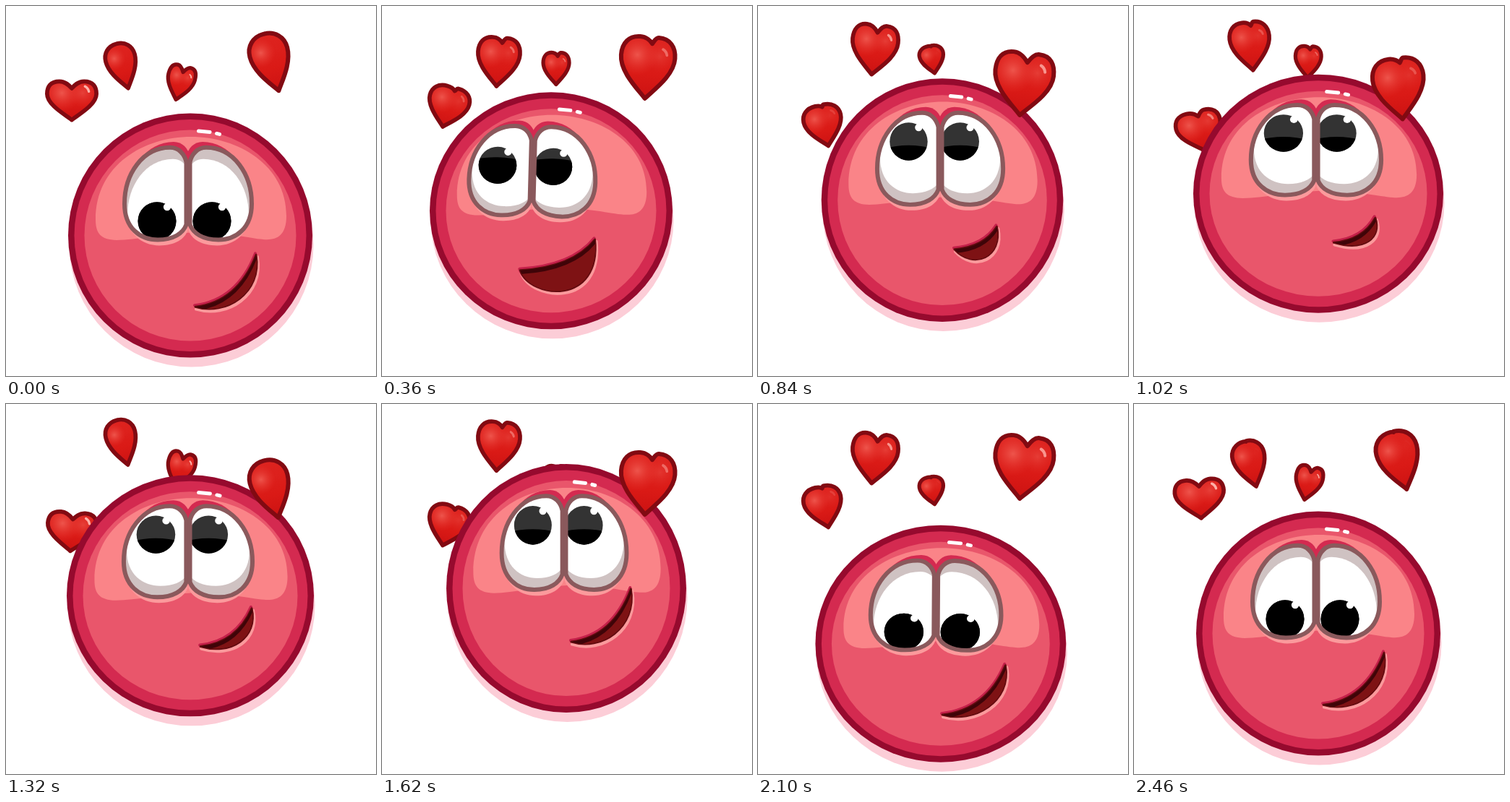
Recreate the animation shown at these times as an HTML page with a canvas. Size 512 px wide and 512 px high, loop 2.52 s.

```html
<!DOCTYPE html>
<html lang="en">
<head>
<meta charset="utf-8">
<title>In love</title>
<style>
html, body { margin: 0; height: 100%; overflow: hidden; background: #fff; }
canvas { display: block; width: 100vmin; height: 100vmin; }
</style>
</head>
<body>
<canvas id="stage" width="512" height="512"></canvas>
<script>
const ctx = document.getElementById('stage').getContext('2d');
const LOOP = 2520, SPIN = LOOP / 2, STEP = 60, TAU = Math.PI * 2;
const LEAN = .26;

// Each heart bobs once per loop (lowest at `low`) and half-turns every SPIN.
const hearts = [
  { x: 91, y: 154, bob: 23, low: 1260, edge: [46, 66], front: [74, 59], leanAt: 315, faceAt: 0 },
  { x: 241, y: 97, bob: 23, low: 2060, edge: [37, 40], front: [43, 53], leanAt: 50, faceAt: 70 },
  { x: 161, y: 68, bob: 15, low: 0, edge: [46, 69], front: [72, 75], leanAt: 615, faceAt: 660 },
  { x: 367, y: 98, bob: 20, low: 1260, edge: [58, 87], front: [91, 93], leanAt: 615, faceAt: 660 }
];

const mix = (a, b, k) => a + (b - a) * k;

function ease(t, from, to) {
  const k = Math.min(1, Math.max(0, (t - from) / (to - from)));
  return k * k * (3 - 2 * k);
}

const pulse = (t, at, before, after = before) => ease(t, at - before, at) - ease(t, at, at + after);

function poseAt(t) {
  const up = ease(t, 0, 600) - ease(t, 1620, 2010);
  const peek = pulse(t, 360, 360, 240);
  const wow = pulse(t, 600, 240, 420);
  const calm = pulse(t, 1020, 420, 600);
  const glance = pulse(t, 1860, 240, 300);
  const dip = pulse(t, 120, 120) + pulse(t, 2070, 210);
  const hover = pulse(t, 810, 210) + pulse(t, 1320, 300);
  const stretch = 7.5 * wow - 4 * calm + 6 * pulse(t, 1740, 240) - 5 * dip - 2 * peek;
  const radius = 169 - 3 * (peek + wow + glance);
  const eyeX = -3 - 23 * peek - 33 * glance;
  const eyeY = -58 - 4 * up + 4 * peek + 11 * wow + 32 * glance;
  return {
    x: 255 - 21 * (peek + glance),
    y: 317.5 - up * (50 + t / 130) + 15 * dip + 8 * hover,
    rx: radius - stretch,
    ry: radius + stretch,
    eyes: {
      x: eyeX, y: eyeY,
      tilt: .026 * peek + .06 * glance,
      px: -43 - 5 * peek - up,
      py: 38 - 62 * up - 5 * peek,
      gap: 76 - 4 * up + 4 * peek,
      lid: 1.8 * up - 1.6
    },
    mouth: {
      x: eyeX + 52 - 17 * peek - 6 * wow - 8 * glance,
      y: eyeY + 121 - 22 * up + 13 * peek + 6 * wow + 15 * calm,
      w: 84 + 20 * peek - 20 * wow - 28 * calm + 10 * glance,
      h: 72 - 28 * peek - 46 * wow - 37 * calm - 13 * glance,
      right: 53 + 42 * peek + 12 * wow - 25 * calm - 8 * glance,
      left: 13 + 28 * peek + 40 * wow
    }
  };
}

function fill(path, color, dx = 0, dy = 0) {
  ctx.save();
  ctx.translate(dx, dy);
  ctx.fillStyle = color;
  ctx.fill(path);
  ctx.restore();
}

function line(path, width, color) {
  ctx.lineWidth = width;
  ctx.strokeStyle = color;
  ctx.stroke(path);
}

function ellipse(x, y, rx, ry, color) {
  ctx.beginPath();
  ctx.ellipse(x, y, rx, ry, 0, 0, TAU);
  ctx.fillStyle = color;
  ctx.fill();
}

function heartPath(w, h, open) {
  const p = new Path2D(), lobe = .25 * w * open, top = -h / 2;
  const notchX = .28 * w * open * (1 - open), notchY = top + .18 * h * open ** 1.5;
  const reach = lobe + (.28 - .1 * open) * w;
  p.moveTo(0, h / 2);
  p.bezierCurveTo(-.14 * w, .36 * h, -.5 * w, .1 * h, -.5 * w, -.18 * h);
  p.bezierCurveTo(-.5 * w, -.37 * h, -reach, top, -lobe, top);
  p.bezierCurveTo(mix(-lobe, notchX, .5), top, notchX - lobe * .2, mix(top, notchY, .6), notchX, notchY);
  p.bezierCurveTo(notchX + lobe * .2, mix(top, notchY, .6), mix(notchX, lobe, .5), top, lobe, top);
  p.bezierCurveTo(reach, top, .5 * w, -.37 * h, .5 * w, -.18 * h);
  p.bezierCurveTo(.5 * w, .1 * h, .14 * w, .36 * h, 0, h / 2);
  p.closePath();
  return p;
}

function glow(x, y, r, alpha) {
  const g = ctx.createRadialGradient(x, y, 0, x, y, r);
  g.addColorStop(0, `rgba(242,98,88,${alpha})`);
  g.addColorStop(1, 'rgba(232,55,48,0)');
  return g;
}

function drawHeart({ x, y, bob, low, edge, front, leanAt, faceAt }, t) {
  const open = Math.abs(Math.cos(Math.PI * (t - faceAt) / SPIN)) ** 1.2;
  const border = 4.5 + front[0] / 60;
  const w = mix(edge[0], front[0], open) - border;
  const h = mix(edge[1], front[1], open) - border;
  const path = heartPath(w, h, open);
  ctx.save();
  ctx.translate(x, y + bob * Math.cos(TAU * (t - low) / LOOP));
  ctx.rotate(LEAN * Math.cos(TAU * (t - leanAt) / SPIN));
  const base = ctx.createLinearGradient(0, -h / 2, 0, h / 2);
  base.addColorStop(0, '#de2420');
  base.addColorStop(.6, '#da1a16');
  base.addColorStop(1, '#cc1212');
  fill(path, base);
  fill(path, glow(-.2 * w, -.2 * h, .38 * w, .8));
  fill(path, glow(.22 * w, -.2 * h, .3 * w, .5 * open));
  ctx.lineJoin = ctx.lineCap = 'round';
  line(path, border, '#820a12');
  ctx.globalAlpha = open * open;
  ctx.beginPath();
  ctx.arc(.2 * w, -.2 * h, .15 * w, -1.1, -.2);
  ctx.lineWidth = .05 * w;
  ctx.strokeStyle = '#ffb4ac';
  ctx.stroke();
  ctx.restore();
}

const shine = new Path2D('M-131-22C-131-98-64-137 1-137S133-98 133-27C133 2 118 7 101 5.5C81 4 56-4 1-4C-39-2-74 6-102 6.5C-124 6-131-3-131-22Z');
const eyeShape = new Path2D('M-2.5-44C-5-55-13-64-25-64C-63-64-88-27-88 14C-88 48-66 64-42 64C-20 64-7 55-2.5 43Z');
const gloss = new Path2D('M11.500-145L27-143.500M36.500-141.500L40.500-140.500');

function drawEye(side, px, py, lid) {
  const r = 26.5;
  ctx.save();
  ctx.scale(side, 1);
  fill(eyeShape, '#cfc2c2');
  ctx.clip(eyeShape);
  fill(eyeShape, '#fff', 4, 16 * Math.tanh((py - 6) / 12));
  ctx.scale(side, 1);
  ctx.save();
  ellipse(px, py, r, r, '#333');
  ctx.clip();
  ellipse(px, py + lid * r + 60, 90, 60, '#000');
  ctx.restore();
  ellipse(px + 14, py - 19.5, 5.2, 5.2, '#fff');
  ctx.restore();
  ctx.save();
  ctx.scale(side, 1);
  line(eyeShape, 6, '#8a595c');
  ctx.restore();
}

function drawEyes({ x, y, tilt, px, py, gap, lid }) {
  ctx.save();
  ctx.translate(x, y);
  ctx.rotate(tilt);
  for (const side of [1, -1]) {
    ctx.save();
    ctx.scale(side, 1);
    fill(eyeShape, '#d42a50', 5, -8);
    fill(eyeShape, '#fb9a9c', 2, 8);
    ctx.restore();
  }
  drawEye(1, px, py, lid);
  drawEye(-1, px + gap, py, lid);
  ctx.restore();
}

function drawMouth({ x, y, w, h, right, left }) {
  const p = new Path2D(), lx = x - w / 2, ly = y + h / 2, rx = x + w / 2, ry = y - h / 2;
  p.moveTo(lx, ly);
  p.quadraticCurveTo(rx - .3 * w, ly - .1 * h, rx, ry);
  p.bezierCurveTo(rx + 9, ry + right, lx + Math.max(4, 55 - left), ly + left, lx, ly);
  p.closePath();
  ctx.save();
  ctx.lineJoin = 'round';
  ctx.translate(1.5, 3);
  fill(p, '#fb9a9c');
  line(p, 5, '#fb9a9c');
  ctx.translate(-2.5, -5);
  fill(p, '#c4204a');
  line(p, 4, '#c4204a');
  ctx.translate(1, 2);
  line(p, 3, '#640c10');
  fill(p, '#3f0408');
  ctx.clip(p);
  fill(p, '#7e1214', 1, 5.5);
  ctx.restore();
}

function drawBall({ x, y, rx, ry, eyes, mouth }) {
  ellipse(x + 1.5, y + 13, rx, ry, '#fccdd7');
  ellipse(x, y, rx, ry, '#960a2e');
  ellipse(x, y, rx - 8.5, ry - 8.5, '#d42a50');
  ellipse(x, y, rx - 22.5, ry - 23, '#e9566b');
  ctx.save();
  ctx.translate(x, y);
  ctx.scale(rx / 169, ry / 169.5);
  fill(shine, '#fa8488');
  ctx.lineCap = 'round';
  line(gloss, 5, '#fff');
  drawEyes(eyes);
  drawMouth(mouth);
  ctx.restore();
}

function draw(now) {
  const t = Math.floor(now % LOOP / STEP) * STEP;
  ctx.fillStyle = '#fff';
  ctx.fillRect(0, 0, 512, 512);
  hearts.slice(0, 2).forEach(heart => drawHeart(heart, t));
  drawBall(poseAt(t));
  hearts.slice(2).forEach(heart => drawHeart(heart, t));
}

const start = performance.now();
function tick() {
  draw(performance.now() - start);
  requestAnimationFrame(tick);
}
tick();
</script>
</body>
</html>
```
